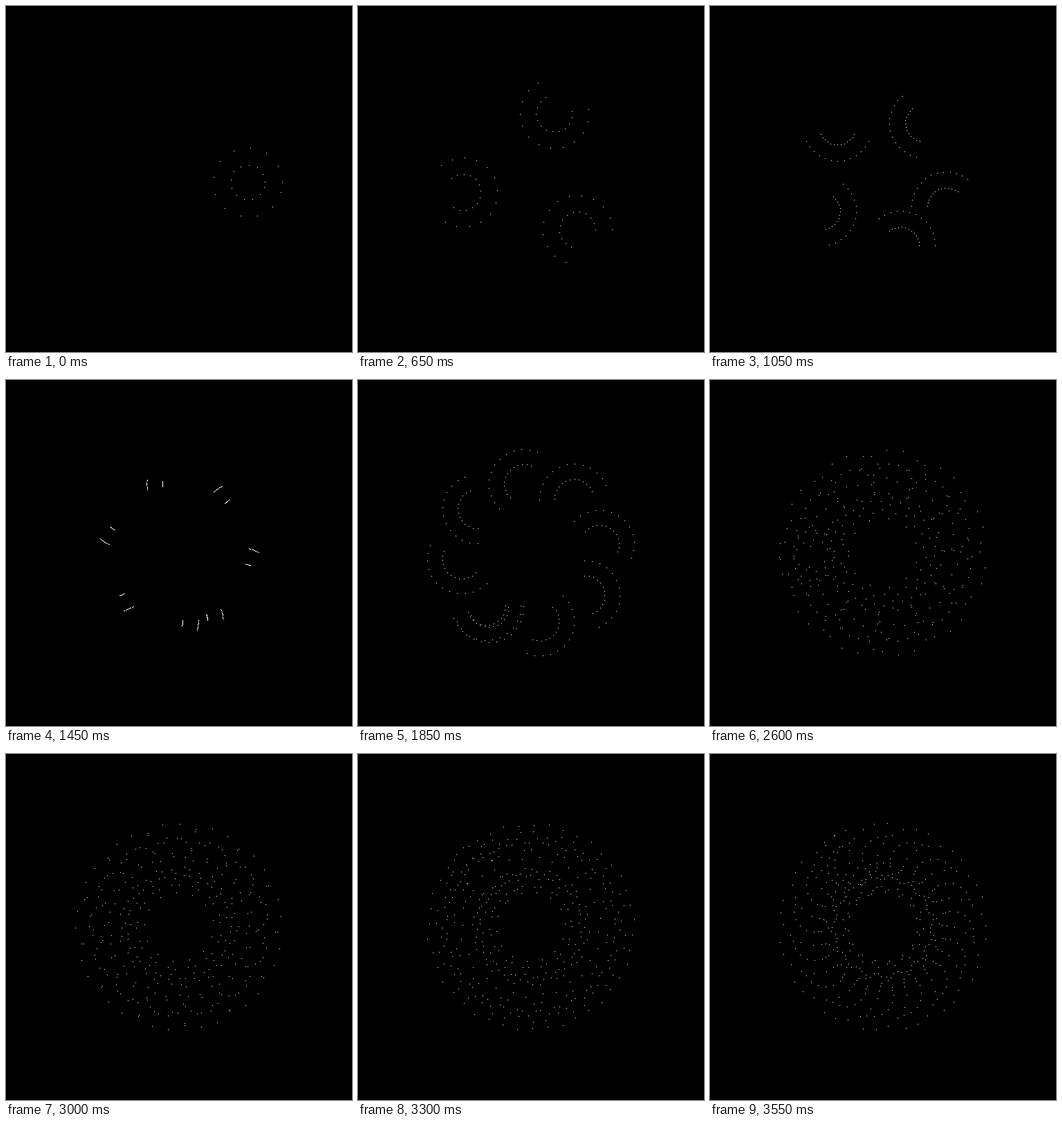
Write an HTML page with a canvas that moves like this. It is 500 px wide and 500 px high and loops after 3.6 s.

```html
<!DOCTYPE html>
<html>
<head>
<meta charset="utf-8">
<title>Dotted rings</title>
<style>
  html, body { margin: 0; background: #000; overflow: hidden; }
  canvas { display: block; }
</style>
</head>
<body>
<canvas id="stage" width="500" height="500"></canvas>
<script>
const ctx = document.getElementById('stage').getContext('2d');
const FRAME_MS = 50, FRAMES = 72, DOTS = 13;
const CENTER = 250, ORBIT = 100, OUTER = 50;

function dot(x, y) {
  ctx.fillRect(Math.floor(x), Math.floor(y), 1, 1);
}

function draw(frame) {
  const spin = 0.05 + 0.06 * frame;
  const clusterStep = 2 * Math.PI / (0.2122 * (frame + 1));
  const dotStep = -0.5 * Math.cos(0.054 * (frame + 1));
  const inner = 25 + frame / 12;

  ctx.fillStyle = '#000';
  ctx.fillRect(0, 0, 500, 500);
  ctx.fillStyle = '#fff';

  // Clusters fill the turn one step at a time; the last gap stays uneven.
  for (let a = 0; a < 2 * Math.PI; a += clusterStep) {
    const cx = CENTER + ORBIT * Math.cos(a + spin);
    const cy = CENTER + ORBIT * Math.sin(a + spin);
    for (let i = 0; i < DOTS; i++) {
      const angle = a + i * dotStep;
      for (const r of [OUTER, inner]) {
        dot(cx + r * Math.cos(angle), cy + r * Math.sin(angle));
      }
    }
  }
}

const start = performance.now();
function tick() {
  const elapsed = performance.now() - start;
  draw(Math.floor(elapsed / FRAME_MS) % FRAMES);
  requestAnimationFrame(tick);
}
tick();
</script>
</body>
</html>
```
